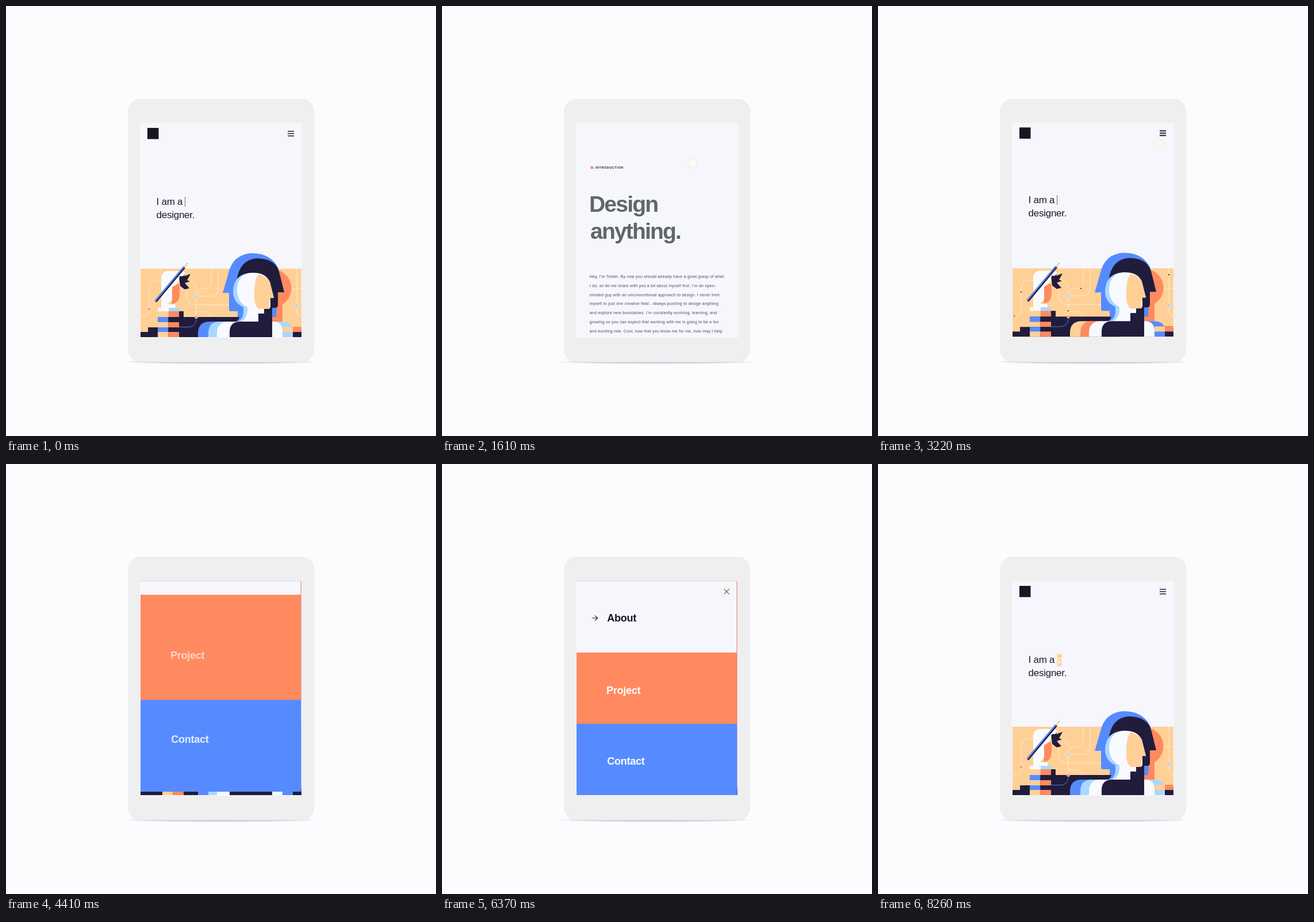
Recreate the animation shown at these times as an HTML page. Size 748x748 px, loop 8330 ms.

```html
<!DOCTYPE html>
<html lang="en">
<head>
<meta charset="utf-8">
<title>Portfolio on a tablet</title>
<style>
  html, body { margin: 0; width: 100%; height: 100%; overflow: hidden; background: #fafcfe; }
  svg { display: block; width: 100vw; height: 100vh; }
  text { font-family: "Liberation Sans", Arial, sans-serif; white-space: pre; }
  .lead { font-size: 17px; letter-spacing: -.25px; fill: #1a1a2a; }
  .title { font: bold 39px "Liberation Sans", Arial, sans-serif; letter-spacing: -1.8px; fill: #3c3f44; }
  .body { font-size: 7px; letter-spacing: .23px; fill: #4b4a5e; }
  .label { font-size: 5.3px; font-weight: bold; letter-spacing: .7px; fill: #1a1a2a; }
  .item { font-size: 18px; font-weight: bold; letter-spacing: -.25px; fill: #fff; }
  .wire { fill: none; stroke: #fff1dc; stroke-width: .8; }
  .dark { fill: #211c3c; } .blue { fill: #568bff; } .sky { fill: #a9d8ff; }
  .orange { fill: #ff8a60; } .peach { fill: #ffd096; } .white { fill: #f9faff; }
</style>
</head>
<body>
<svg viewBox="0 0 748 748" xmlns="http://www.w3.org/2000/svg">
  <defs>
    <clipPath id="screen"><rect x="233" y="203.5" width="282" height="373.5"/></clipPath>
    <clipPath id="shoulder"><path d="M463 549H495Q514 549 514 567V576H463Z"/></clipPath>
    <radialGradient id="shade">
      <stop offset="0" stop-color="#c3c1d4"/>
      <stop offset=".8" stop-color="#cfcedd" stop-opacity=".75"/>
      <stop offset="1" stop-color="#e8e8f0" stop-opacity="0"/>
    </radialGradient>
  </defs>

  <rect width="748" height="748" fill="#fafcfe"/>
  <ellipse cx="372" cy="619" rx="174" ry="4" fill="url(#shade)"/>
  <rect x="213" y="162" width="322.5" height="457" rx="21" fill="#efefef" stroke="#e9e9eb" stroke-width=".8"/>

  <g clip-path="url(#screen)">
    <rect x="233" y="203" width="282" height="374" fill="#f6f7fc"/>

    <g id="home">
      <g id="header">
        <rect x="246" y="212" width="19.5" height="19.5" fill="#161625"/>
        <path id="burger" d="M490 218H501M490 222H501M490 226H501" stroke="#222233" stroke-width="1.3"/>
      </g>
      <g id="intro">
        <rect id="mark" class="peach" x="311.5" y="331" height="20.5"/>
        <text class="lead" x="261.5" y="346">I am a</text>
        <text class="lead" id="word" x="312.5" y="346"></text>
        <rect id="caret" y="332" width=".9" height="17" fill="#55566a"/>
        <text class="lead" x="261.5" y="369">designer.</text>
      </g>

      <g id="art">
        <rect class="peach" x="234" y="457" width="280" height="119"/>
        <g class="wire">
          <path id="track" d="M235 540h5a9 9 0 0 0 9-9V491a13 13 0 0 1 13-13h10"/>
          <path d="M314 470V505a15 15 0 0 0 15 15H390M357 457V482a10 10 0 0 1-10 10H340a9 9 0 0 0-9 9V541"/>
          <path d="M369 457V493a12 12 0 0 1-12 12H331M331 492a14 14 0 0 0-14-14H300M331 532H344a12 12 0 0 1 12 12"/>
          <path d="M506 457V532a8 8 0 0 0 8 8M496 492H514"/>
        </g>

        <path class="dark" d="M234 576V567H247V559H264V541H301V531H309V541H390V541H420V576Z"/>
        <path d="M301 558.500H318a13 13 0 0 0 13-13V541" fill="none" stroke="#568bff" stroke-width=".8"/>
        <g id="sleeve"></g>

        <path class="dark" d="M301 471L306 464 311 465 310 470 321 466 315 477 320 479 311 482 319 491 311 493 303 487Z"/>
        <path class="orange" d="M288 518V490Q291 484 301 484Q304 500 300 511Q297 517 288 518Z"/>
        <path class="white" d="M270 531V473a12 12 0 0 1 12-12H308L312 465 308 470H302Q301 484 289 489V510Q288 515 283 516V519H295V525H283V531H264V525H270Z"/>
        <rect class="sky" x="283" y="525" width="18" height="6"/>
        <g transform="translate(260 514) rotate(-50)">
          <rect class="blue" y="-2.5" width="78" height="2.7"/>
          <rect class="dark" width="78" height="2.4"/>
          <path class="peach" d="M78-2.500L87 0 78 2.400Z"/>
          <path class="dark" d="M85-.6L87 0 85 .6Z"/>
        </g>

        <path class="orange" d="M463 458A33 33 0 0 1 481 519V550H463Z"/>
        <path class="blue" d="M377 499L386 468Q394 430 430 430Q462 431 474 457L470 541H403V531H391Q388 531 388 528V499Z"/>
        <path class="dark" d="M401 479Q406 440 438 439Q471 440 476 466L484 498H473V520Q473 525 468 525H463V550H420Z"/>
        <path class="blue" d="M390 530H406V541Q404 549 396 550H435V520H390Z"/>
        <path class="sky" d="M395 497Q396 465 428 464L440 535 430 550H397Q413 548 413 532V524Q395 516 395 497Z"/>
        <path class="white" d="M402 492Q404 464 430 464Q452 464 459 480L466 508H460V522Q460 527 455 527H449V535H439V550H406Q419 546 420 530V524Q402 516 402 492Z"/>
        <path class="peach" d="M432 507Q431 474 440 467Q455 471 459 480L466 508H460V514H458V527H439Q432 520 432 507Z"/>

        <g clip-path="url(#shoulder)">
          <rect class="peach" x="463" y="549" width="51" height="9"/>
          <rect class="dark" x="463" y="558" width="51" height="18"/>
          <rect class="orange" x="499" y="558" width="15" height="9"/>
        </g>
        <path id="rightBand" d="M463 549H482Q499 550 499 566V576H463Z"/>
        <rect class="peach" x="481" y="558" width="18" height="9"/>
        <path class="white" d="M420 549H466Q481 550 481 566V576H420Z"/>
        <path id="outerBand" d="M334 576V568Q335 549 354 549H420V576Z"/>
        <path id="innerBand" d="M352 576V568Q353 549 371 549H420V576Z"/>
        <path class="white" d="M367 576V568Q368 549 387 549H420V576Z"/>
        <path class="dark" d="M389 576V566Q390 549 407 549H439V535H449V527H460V513H463V576Z"/>

        <g stroke="#fff1dc" stroke-width=".7">
          <circle class="sky" cx="330.500" cy="505" r="3"/>
          <circle class="sky" cx="506" cy="521.500" r="3"/>
          <circle class="orange" cx="331" cy="541" r="2.600"/>
          <circle class="orange" id="runner" r="2.500"/>
        </g>
        <g id="sparks" fill="#211c3c"></g>
      </g>
    </g>

    <g id="about">
      <g id="aboutLabel">
        <rect class="orange" x="258.500" y="273" width="4.500" height="4.500"/>
        <text class="label" x="266.800" y="277">INTRODUCTION</text>
      </g>
      <g id="aboutTitle">
        <text class="title" x="256" y="350">Design</text>
        <text class="title" x="258" y="397">anything.</text>
      </g>
      <g id="aboutBody"></g>
    </g>

    <g id="menu"></g>
    <circle id="touch" r="7.700" fill="#fffcf7" fill-opacity=".75" stroke="#f8e2cb" stroke-width="1"/>
    <path id="cross" d="M490.500 217.500L499.500 226.500M499.500 217.500L490.500 226.500" stroke="#62626c" stroke-width="1.100"/>
  </g>
</svg>

<script>
const LOOP = 8330, CYCLE = LOOP / 3;
const NS = "http://www.w3.org/2000/svg";
const $ = id => document.getElementById(id);
const set = (el, attrs) => { for (const k in attrs) el.setAttribute(k, attrs[k]); return el; };
const add = (parent, tag, attrs, text = "") => {
  const el = set(document.createElementNS(NS, tag), attrs);
  el.textContent = text;
  return parent.appendChild(el);
};
const clamp = v => Math.min(1, Math.max(0, v));
const lerp = (a, b, u) => a + (b - a) * u;
const span = (t, from, to) => clamp((t - from) / (to - from));
const easeOut = p => 1 - (1 - p) ** 3;
const easeInOut = p => p < .5 ? 4 * p ** 3 : 1 - 4 * (1 - p) ** 3;
const shift = (el, y) => set(el, { transform: `translate(0 ${y.toFixed(2)})` });

[
  "Hey, I’m Torbin. By now you should already have a good grasp of what",
  "I do; so let me share with you a bit about myself first. I’m an open-",
  "minded guy with an unconventional approach to design. I never limit",
  "myself to just one creative field - always pushing to design anything",
  "and explore new boundaries. I’m constantly evolving, learning, and",
  "growing so you can expect that working with me is going to be a fun",
  "and exciting ride. Cool, now that you know me for me, how may I help",
  "you today?"
].forEach((line, i) => add($("aboutBody"), "text", { class: "body", x: 256.7, y: 463.5 + 15.7 * i }, line));

// Striped sleeve: alternating two-tone rows
const stripes = [531, 541, 550, 559, 567].map((y, i) => {
  const row = add($("sleeve"), "g", {});
  const h = i === 0 ? 10 : 9;
  add(row, "rect", { class: i % 2 ? "blue" : "peach", x: 264, y, width: 18.5, height: h });
  add(row, "rect", { class: i % 2 ? "dark" : "orange", x: 282.5, y, width: 18.5, height: h });
  return row;
});

const sparks = [
  [249, 527, 249, 478], [340, 492, 362, 492], [331, 541, 331, 524], [506, 490, 506, 453]
].map(path => ({ path, el: add($("sparks"), "circle", { r: 1.1 }) }));

// Panels drop from the top edge, lowest one first
const panels = [
  { name: "Contact", fill: "#568bff", x: 234, end: 576, y: 523, open: 3738, textIn: 3954, close: 6680, hover: [5000, 5250] },
  { name: "Project", fill: "#ff8a60", x: 234, end: 452, y: 399.5, open: 3889, textIn: 4012, close: 6600, hover: [5250, 5650] },
  { name: "About", fill: "#f6f7fc", x: 233, end: 328, y: 274, open: 4120, textIn: 4250, close: 6500, hover: [5650, 6480] }
];
for (const p of panels) {
  const ink = p.name === "About" ? "#161625" : "#fff";
  p.rect = add($("menu"), "rect", { x: p.x, y: 203.5, width: p.x === 233 ? 279.5 : 279.5, fill: p.fill });
  p.text = add($("menu"), "text", { class: "item", x: p.name === "Project" ? 286 : 287.3, y: p.y, style: `fill:${ink}` }, p.name);
  p.arrow = add($("menu"), "path", {
    d: `M261 ${p.y - 6}h9.500m-4.300-4.300l4.300 4.300-4.300 4.300`, fill: "none", stroke: ink, "stroke-width": 1.1
  });
}

// time, x, y, opacity
const touchKeys = [
  [850, 430, 520, 0], [1000, 430, 520, 1], [1610, 436, 274, .9], [1750, 436, 262, 0],
  [2100, 445, 305, 0], [2250, 445, 310, 1], [2450, 447, 391, 1], [2750, 450, 500, 0],
  [2950, 460, 330, 0], [3220, 490, 240, .9], [3450, 495, 222, 1], [3700, 495, 222, 0],
  [4700, 420, 540, 0], [5000, 400, 517, 1], [5350, 390, 393, 1], [5750, 400, 268, 1],
  [5900, 400, 268, 1], [6370, 493, 222, 1], [6600, 493, 222, 0]
];

function drawTouch(t) {
  const next = touchKeys.findIndex(k => k[0] > t);
  if (next < 1) return set($("touch"), { opacity: 0 });
  const a = touchKeys[next - 1], b = touchKeys[next];
  const u = span(t, a[0], b[0]), e = u * u * (3 - 2 * u);
  set($("touch"), { cx: lerp(a[1], b[1], e), cy: lerp(a[2], b[2], e), opacity: lerp(a[3], b[3], u) });
}

function drawWord(t) {
  const full = "product", marked = t > 7700;
  let count;
  if (t < 2000) count = Math.floor(full.length * span(t, 140, 840));
  else if (t < 7900) count = Math.floor(full.length * span(t, 3500, 4100));
  else count = Math.round(full.length * (LOOP - t) / (LOOP - 7900));
  const word = $("word");
  word.textContent = full.slice(0, count);
  word.style.fill = marked ? "#fff" : "";
  const width = count ? word.getComputedTextLength() : 0;
  set($("mark"), { width: marked && count ? Math.max(0, width - 1) : 0 });
  set($("caret"), { x: 311.2 + width, opacity: marked && count ? 0 : 1 });
}

function drawArt(t) {
  const phase = t % CYCLE / CYCLE;
  const trip = easeInOut(span(phase, .03, .18)) - easeInOut(span(phase, .78, .94));
  const at = $("track").getPointAtLength(23 - 21 * trip);
  set($("runner"), { cx: at.x, cy: at.y });
  const u = span(phase, .03, .25);
  for (const { path: [x0, y0, x1, y1], el } of sparks)
    set(el, { cx: lerp(x0, x1, u), cy: lerp(y0, y1, u), opacity: clamp(8 * u * (1 - u)) });
  const warm = phase > .08 && phase < .3;
  set($("outerBand"), { class: warm ? "peach" : "blue" });
  set($("innerBand"), { class: warm ? "orange" : "sky" });
  set($("rightBand"), { class: warm || phase > .4 && phase < .8 ? "blue" : "sky" });
  const sway = 8 * (easeInOut(span(phase, .42, .52)) - easeInOut(span(phase, .72, .82)));
  set(stripes[4], { transform: `translate(${sway.toFixed(2)} 0)` });
}

function drawPages(t) {
  const away = t < 2000 ? easeInOut(span(t, 880, 1400)) : 1 - easeOut(span(t, 2600, 3584));
  set($("home"), { opacity: clamp(1.15 - 1.3 * away) });
  shift($("intro"), -60 * away);
  shift($("header"), -14 * away);
  shift($("art"), -14 * away);
  set($("burger"), { "stroke-width": 1.3 + .6 * span(t, 3120, 3200) * (1 - span(t, 6600, 6700)) });

  const p = span(t, 1150, 1950), rest = 1 - easeOut(p);
  const fade = 1 - span(t, 2380, 2540);
  set($("about"), { opacity: fade });
  set(shift($("aboutLabel"), 78 * rest), { opacity: clamp(p * 2) });
  set(shift($("aboutTitle"), 104 * rest), { opacity: clamp((p - .1) / .6) });
  set(shift($("aboutBody"), 130 * rest), { opacity: clamp(p * 2) });
}

function drawMenu(t) {
  const leaving = 1 - span(t, 6450, 6600);
  for (const p of panels) {
    const grow = easeInOut(span(t, p.open, p.open + 800)) - easeInOut(span(t, p.close, p.close + 800));
    set(p.rect, { height: Math.max(0, (p.end - 203.5) * grow) });
    const q = span(t, p.textIn, p.textIn + 800);
    set(shift(p.text, -120 * (1 - easeInOut(q))), { opacity: clamp((q - .26) * 2.7) * leaving });
    const [on, off] = p.hover;
    const shown = span(t, on, on + 150) - span(t, off, off + 100);
    set(p.arrow, { opacity: shown });
  }
  set($("cross"), { opacity: span(t, 4600, 4750) * leaving });
}

function render(now) {
  const t = now % LOOP;
  drawPages(t);
  drawArt(t);
  drawWord(t);
  drawMenu(t);
  drawTouch(t);
}

const start = performance.now();
function tick() {
  render(performance.now() - start);
  requestAnimationFrame(tick);
}
tick();
</script>
</body>
</html>
```
